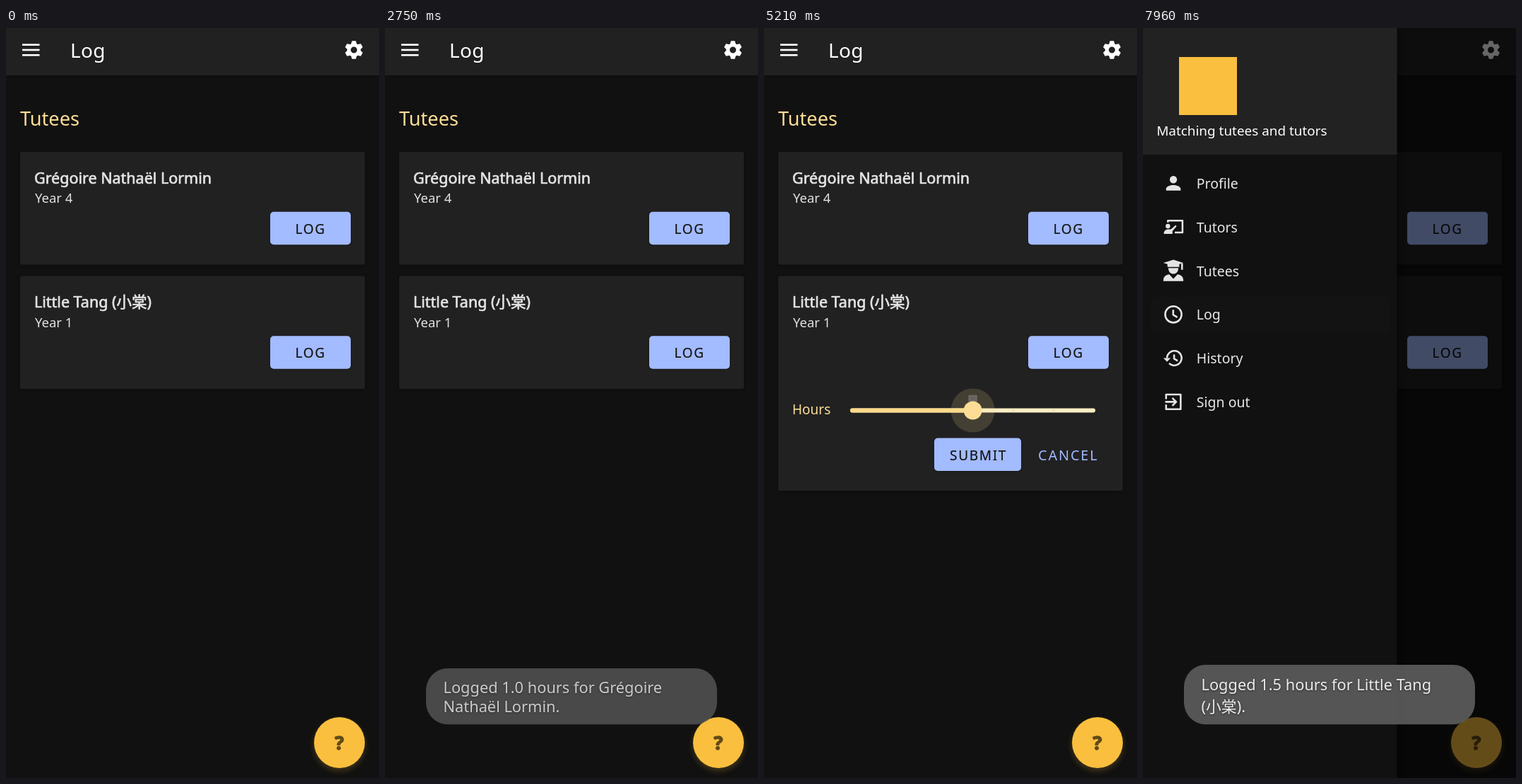
An HTML page with a canvas that plays this animation: 528 by 1060 pixels, repeating every 8000 ms.

```html
<!DOCTYPE html>
<html lang="en">
<head>
<meta charset="utf-8">
<title>Tutee log</title>
<style>
  html, body { margin: 0; width: 100%; height: 100%; overflow: hidden; background: #111; }
  canvas { display: block; width: 528px; height: 1060px; }
</style>
</head>
<body>
<canvas id="stage" width="528" height="1060"></canvas>
<script>
const ctx = document.getElementById('stage').getContext('2d');
const W = 528, H = 1060, LOOP = 8000;
const FONT = '"Noto Sans", "Noto Sans CJK SC", "Noto Sans CJK JP", sans-serif';
const BLUE = '#a3bbff', GOLD = '#fabf3e', CREAM = '#fddd95', LIGHT = '#e2e2e2';

const tutees = [
  { name: 'Grégoire Nathaël Lormin', year: 'Year 4', tap: 40, open: 170, submit: 2170, close: 2300,
    drag: { down: 1330, up: 2010, steps: [1640] } },
  { name: 'Little Tang (小棠)', year: 'Year 1', tap: 3210, open: 3330, submit: 5710, close: 5840,
    drag: { down: 4530, up: 5165, steps: [4740, 4900] } }
];
const toasts = [
  { from: 2550, out: 4500, top: 905, base: [940, 967],
    lines: ['Logged 1.0 hours for Grégoire', 'Nathaël Lormin.'] },
  { from: 6010, out: 7930, top: 900, base: [936, 967],
    lines: ['Logged 1.5 hours for Little Tang', '(小棠).'] }
];

const clamp = v => Math.min(1, Math.max(0, v));
const ramp = (t, from, len) => clamp((t - from) / len);
const easeOut = (p, n = 2) => 1 - Math.pow(1 - p, n);

// `bold` thickens the glyphs by a thin outline, for weights between regular and bold.
function text(str, x, y, size, color, { weight = 400, spacing = 0, bold = 0 } = {}) {
  ctx.font = `${weight} ${size}px ${FONT}`;
  ctx.letterSpacing = spacing + 'px';
  ctx.fillStyle = ctx.strokeStyle = color;
  ctx.fillText(str, x, y);
  if (bold) {
    ctx.lineWidth = bold;
    ctx.lineJoin = 'round';
    ctx.strokeText(str, x, y);
  }
}

function box(x, y, w, h, r, color) {
  ctx.fillStyle = color;
  ctx.beginPath();
  ctx.roundRect(x, y, w, h, r);
  ctx.fill();
}

function disc(x, y, r, color) {
  ctx.fillStyle = color;
  ctx.beginPath();
  ctx.arc(x, y, r, 0, Math.PI * 2);
  ctx.fill();
}

function shadowed(blur, dy, color, draw) {
  ctx.save();
  ctx.shadowColor = color;
  ctx.shadowBlur = blur;
  ctx.shadowOffsetY = dy;
  draw();
  ctx.restore();
}

function ripple(t, start, x, y, r, rgb, strength) {
  const fade = ramp(t, start, 75) * (1 - ramp(t, start + 230, 260));
  if (fade <= 0) return;
  disc(x, y, r * (0.3 + 0.7 * easeOut(ramp(t, start, 225))), `rgba(${rgb},${strength * fade})`);
}

function button(label, x, y, w, textX, t, tap) {
  shadowed(3, 1, 'rgba(0,0,0,.2)', () => box(x, y, w, 46.5, 5, BLUE));
  ctx.save();
  ctx.beginPath();
  ctx.roundRect(x, y, w, 46.5, 5);
  ctx.clip();
  ripple(t, tap, x + w / 2, y + 23, w * 0.56, '17,17,17', 0.24);
  ctx.restore();
  text(label, textX, y + 31, 19, '#141414', { spacing: 1.7, bold: 0.2 });
}

function slider(y, t, drag) {
  const step = 57.2, x0 = 124;
  const pos = 1 + drag.steps.filter(s => t >= s).length;
  const x = x0 + pos * step;
  box(122, y - 3, 347, 6, 3, '#fdedc4');
  box(122, y - 3, x - 122, 6, 3, '#fcd98a');
  for (let i = pos + 1; i < 6; i++) disc(x0 + i * step, y, 1.2, '#f6d88e');

  const halo = ramp(t, drag.down, 90) * (1 - ramp(t, drag.up + 40, 90));
  if (halo > 0) {
    disc(x, y, 31 * easeOut(ramp(t, drag.down, 140)), `rgba(253,221,149,${0.17 * halo})`);
  }
  const grow = easeOut(ramp(t, drag.down + 20, 90)) * (1 - ramp(t, drag.up, 60));
  if (grow > 0) {
    ctx.save();
    ctx.globalAlpha = Math.min(1, 0.25 + grow);
    ctx.translate(x, y - 10);
    ctx.scale(grow, grow);
    box(-27, -50, 54, 40, 4, '#939393');
    ctx.beginPath();
    ctx.moveTo(-9, -10);
    ctx.lineTo(0, -2);
    ctx.lineTo(9, -10);
    ctx.fill();
    ctx.textAlign = 'center';
    text((pos / 2).toFixed(1), 0, -23, 18, '#1c1c1c');
    ctx.restore();
  }
  disc(x, y, 13, CREAM);
}

function card(tutee, y, t) {
  const open = t >= tutee.open && t < tutee.close;
  const h = open ? 303.5 : 159.5;
  shadowed(4, 1, 'rgba(0,0,0,.3)', () => box(20, y, 488, h, 3, '#212121'));
  text(tutee.name, 40, y + 44.5, 21.5, '#e4e4e4', { bold: 0.7 });
  text(tutee.year, 41, y + 72, 18.5, LIGHT);
  button('LOG', 374, y + 84.7, 114, 409.5, t, tutee.tap);
  if (open) {
    text('Hours', 40, y + 195, 19, CREAM);
    slider(y + 190, t, tutee.drag);
    button('SUBMIT', 241, y + 229, 123, 263, t, tutee.submit);
    text('CANCEL', 388, y + 260, 19.8, BLUE, { spacing: 1.9 });
  }
  return y + h + 16;
}

function gear(x, y) {
  ctx.save();
  ctx.translate(x, y);
  ctx.fillStyle = '#fff';
  ctx.beginPath();
  ctx.arc(0, 0, 9.6, 0, Math.PI * 2);
  ctx.arc(0, 0, 4.5, 0, Math.PI * 2, true);
  ctx.fill();
  for (let i = 0; i < 6; i++) {
    ctx.beginPath();
    ctx.moveTo(-4.2, -8);
    ctx.lineTo(-2.7, -12.8);
    ctx.lineTo(2.7, -12.8);
    ctx.lineTo(4.2, -8);
    ctx.fill();
    ctx.rotate(Math.PI / 3);
  }
  ctx.restore();
}

function appBar(t) {
  shadowed(3, 1, 'rgba(0,0,0,.3)', () => box(0, 0, W, 67, 0, '#212121'));
  ripple(t, 7130, 35, 31, 28, '255,255,255', 0.2);
  for (let i = -1; i < 2; i++) box(23, 29.7 + i * 7.3, 24.5, 2.6, 0, '#fff');
  text('Log', 91, 42, 28, '#fff', { spacing: 0.3 });
  gear(492.5, 31);
}

function fab() {
  shadowed(8, 4, 'rgba(250,191,62,.22)', () => disc(472, 1010, 36, GOLD));
  ctx.textAlign = 'center';
  text('?', 472, 1020, 27, '#624b17', { weight: 700, bold: 1.4 });
  ctx.textAlign = 'left';
}

// Icons on a 24-unit grid: filled part, stroked part.
const menu = [
  ['Profile', 'M12 12a4 4 0 1 0 0-8 4 4 0 0 0 0 8zM4 20v-2c0-2.7 5.3-4 8-4s8 1.3 8 4v2z', ''],
  ['Tutors', 'M6 13.5a2.5 2.5 0 1 0 0-5 2.5 2.5 0 0 0 0 5zM1.5 19.5c0-4 3-5 5-5 2 0 3 0 4-1l4-3.5 1 1.2-4.5 5.3v3z', 'M6 7V5h16v13h-8.500'],
  ['Tutees', 'M1 3.5L12 0l11 3.5-4.500 1.3v3.2h-13V4.800zM6.5 9h11c0 4-2.500 6.500-5.500 6.500S6.500 13 6.500 9zM1 23.5c0-5 2-7 6.500-7.5l4.500 5 4.500-5c4.500.5 6.500 2.500 6.500 7.500z', 'M21.5 4v7'],
  ['Log', '', 'M12 3a9 9 0 1 0 0 18 9 9 0 0 0 0-18zM11.8 7v5.4l4.500 2.700'],
  ['History', 'M1 12h8l-4 4z', 'M5 12a8 8 0 1 1 2.350 5.650M12.8 8v4.600l3.900 2.300'],
  ['Sign out', '', 'M4 9V4h16v16H4v-5M3 12h11.500M10.8 7.7l4.300 4.300-4.300 4.300']
].map(([label, fill, line]) => ({ label, fill: new Path2D(fill), line: new Path2D(line) }));

function drawer(t) {
  const p = easeOut(ramp(t, 7260, 512), 5);
  if (p <= 0) return;
  ctx.fillStyle = `rgba(0,0,0,${0.6 * p})`;
  ctx.fillRect(0, 0, W, H);
  ctx.save();
  ctx.translate(-360 * (1 - p), 0);
  shadowed(8, 0, 'rgba(0,0,0,.5)', () => box(0, 0, 359.5, H, 0, '#111'));
  box(0, 0, 359.5, 179, 0, '#222');
  box(51, 41, 82, 82, 0, GOLD);
  text('Matching tutees and tutors', 19.2, 152, 18.9, '#fff');
  box(11, 380, 338, 51, 4, '#131313');
  menu.forEach(({ label, fill, line }, i) => {
    const y = 220 + i * 61.8;
    text(label, 75.8, y + 7, 19.5, '#e8e8e8');
    ctx.save();
    ctx.translate(43, y - 0.6);
    ctx.scale(1.29, 1.29);
    ctx.translate(-12, -12);
    ctx.fillStyle = ctx.strokeStyle = '#e4e4e4';
    ctx.lineWidth = 2;
    ctx.fill(fill);
    ctx.stroke(line);
    ctx.restore();
  });
  ctx.restore();
}

function toast({ from, out, top, base, lines }, t) {
  const alpha = easeOut(ramp(t, from, 400)) * (1 - ramp(t, out, 400));
  if (alpha <= 0) return;
  ctx.save();
  ctx.globalAlpha = alpha;
  box(58, top, 412, 984.3 - top, 31, '#5c5c5c');
  shadowed(3, 1, 'rgba(0,0,0,.5)', () =>
    lines.forEach((line, i) => text(line, 82.5, base[i], 21.8, '#fafafa')));
  ctx.restore();
}

function draw(t) {
  ctx.fillStyle = '#111';
  ctx.fillRect(0, 0, W, H);
  appBar(t);
  text('Tutees', 20, 138, 27.2, CREAM);
  tutees.reduce((y, tutee) => card(tutee, y, t), 175);
  fab();
  drawer(t);
  toasts.forEach(item => toast(item, t));
}

const start = performance.now();
function tick() {
  draw((performance.now() - start) % LOOP);
  requestAnimationFrame(tick);
}
tick();
</script>
</body>
</html>
```
